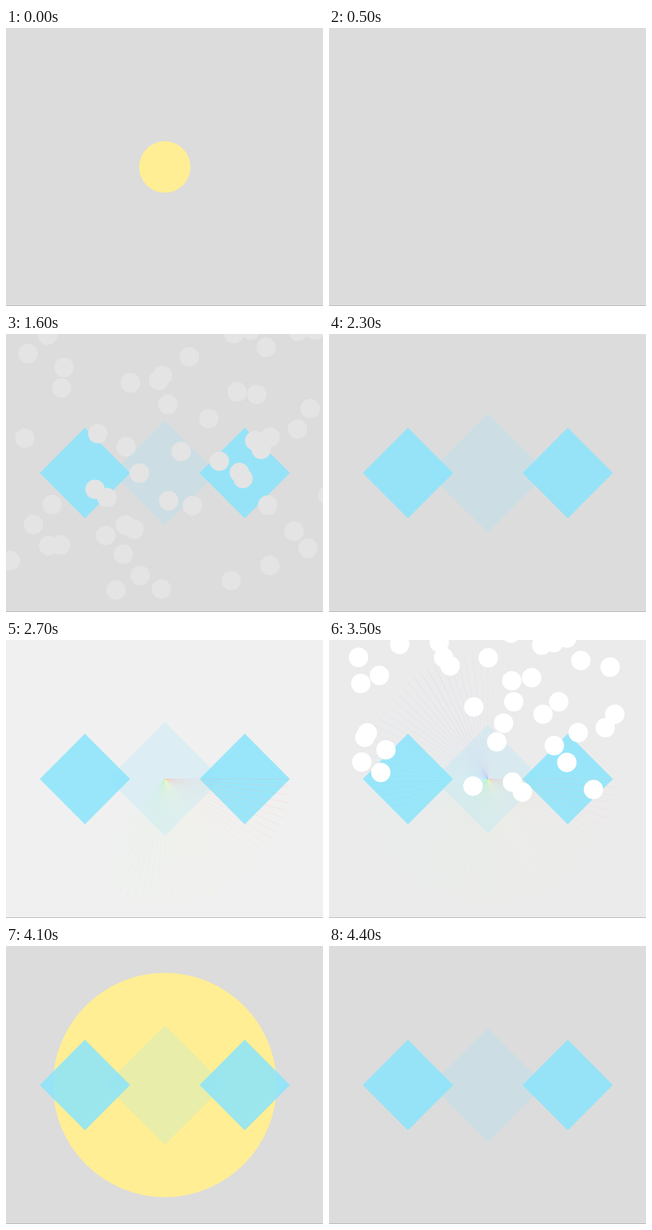
An HTML page with a canvas that plays this animation: 480x420 px, repeating every 4.5 s.

```html
<!DOCTYPE html>
<html lang="en">
<head>
<meta charset="utf-8">
<title>Shapes in motion</title>
<style>
  html, body { margin: 0; width: 480px; height: 420px; overflow: hidden; background: #dcdcdc; }
  canvas { display: block; }
</style>
</head>
<body>
<canvas id="stage" width="480" height="420"></canvas>
<script>
const ctx = document.getElementById('stage').getContext('2d');
const LOOP = 4500, STEP = 100, TAU = Math.PI * 2;
const CX = 240.5, CY = 210;

const mix = (a, b, k) => a + (b - a) * k;
const clamp = k => Math.min(1, Math.max(0, k));
const easeOut = k => 1 - (1 - clamp(k)) ** 3;
const gray = v => `rgb(${v}, ${v}, ${v})`;

// Repeatable random numbers from 0 to 1.
function seeded(seed) {
  return () => {
    seed = (seed * 16807) % 2147483647;
    return seed / 2147483647;
  };
}

function disc(x, y, r, fill) {
  ctx.fillStyle = fill;
  ctx.beginPath();
  ctx.arc(x, y, r, 0, TAU);
  ctx.fill();
}

function diamond(x, half, alpha) {
  ctx.fillStyle = `rgba(139, 229, 252, ${alpha})`;
  ctx.beginPath();
  ctx.moveTo(x, CY - half);
  ctx.lineTo(x + half, CY);
  ctx.lineTo(x, CY + half);
  ctx.lineTo(x - half, CY);
  ctx.fill();
}

// Strength of the bright backdrop and its rays: on at once, then a late fall.
function glow(t) {
  return t < 2500 || t >= 4000 ? 0 : 1 - ((t - 2500) / 1500) ** 3.5;
}

function drawSun(t) {
  const age = t % 4000;
  if (age <= 300) disc(CX, CY, 238 * easeOut((age + 20.5) / 355), '#ffee94');
}

function drawBar(t) {
  if (t < 700 || t > 1200) return;
  const half = (t - 700) * 0.403;
  ctx.save();
  ctx.translate(CX, CY);
  ctx.rotate((t - 800) * 0.0925 * TAU / 360);
  ctx.fillStyle = '#fddbda';
  ctx.fillRect(-12.5, -half, 25, half * 2);
  ctx.restore();
}

function drawDiamonds(t) {
  const grow = easeOut((t - 1300) / 300);
  const pulse = 84.4 + 5.6 * Math.cos((t - 4050) / 1700 * TAU);
  diamond(CX, pulse * grow, 0.2);
  for (const side of [-1, 1]) diamond(CX + side * 121, 68.4 * grow, 0.86);
}

function drawRays(t) {
  const sweep = (t - 1843) * 0.175;
  for (let a = 0; a <= Math.min(sweep, 356.4); a += 3.6) {
    const rad = a * TAU / 360;
    const alpha = 0.25 * glow(t) * clamp((sweep - a) / 50);
    ctx.strokeStyle = `hsla(${a}, 100%, 82%, ${alpha})`;
    ctx.beginPath();
    ctx.moveTo(CX, CY);
    ctx.lineTo(CX + Math.cos(rad) * 190, CY + Math.sin(rad) * 190);
    ctx.stroke();
  }
}

// Dots fall from one point far above, spread over the stage and dim.
function drawBurst(age, seed) {
  if (age < 0 || age >= 850) return;
  const random = seeded(seed);
  const spread = easeOut(age / 600);
  const shade = Math.round(mix(255, 223, clamp((age - 550) / 300)));
  for (let i = 0; i < 52; i++) {
    const x = mix(-15, 495, random());
    const y = mix(-10, 388, random());
    disc(mix(240, x, spread), mix(-400, y, spread), 14.7, gray(shade));
  }
}

function draw(t) {
  ctx.fillStyle = gray(Math.round(220 + 20 * glow(t)));
  ctx.fillRect(0, 0, 480, 420);
  drawSun(t);
  drawBar(t);
  drawDiamonds(t);
  if (glow(t)) drawRays(t);
  drawBurst(t - 800, 90210);
  drawBurst(t - 3250, 41017);
  ctx.fillStyle = '#b4b4b4';
  ctx.fillRect(0, 419, 480, 1);
}

const begin = performance.now();
function tick() {
  const t = (performance.now() - begin) % LOOP;
  draw(Math.floor(t / STEP) * STEP);
  requestAnimationFrame(tick);
}
tick();
</script>
</body>
</html>
```
